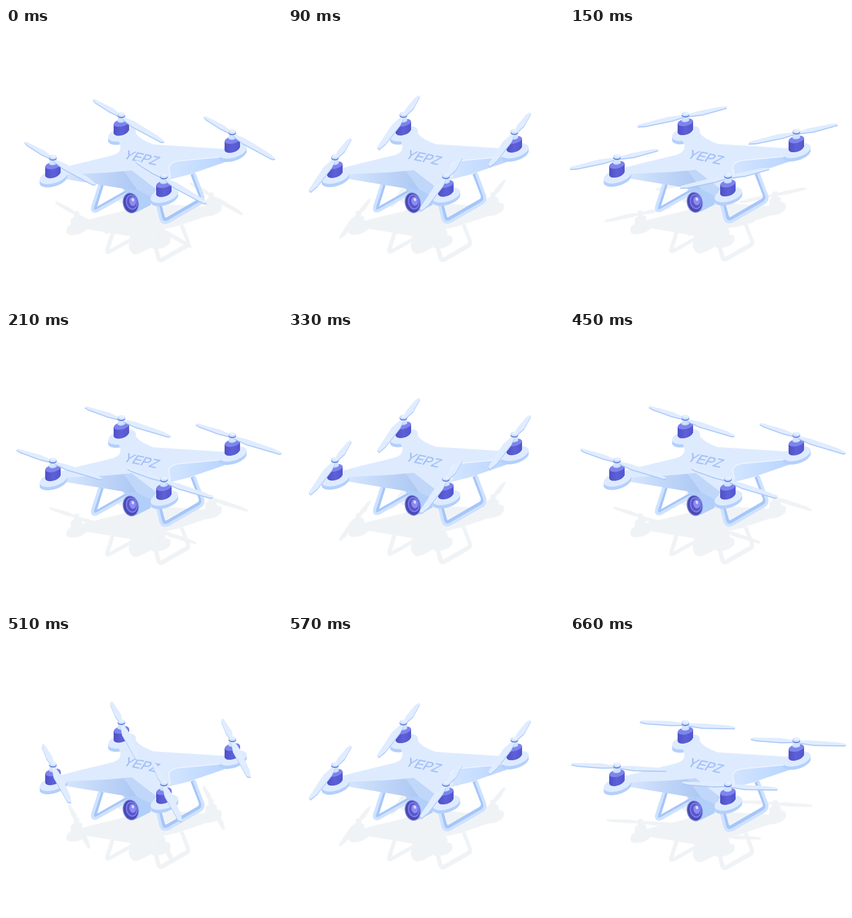
Write an HTML page that moves like this. It is 500 px wide and 500 px high and loops after 0.69 s.

```html
<!DOCTYPE html>
<html lang="en">
<head>
<meta charset="utf-8">
<title>Drone</title>
<style>
  html, body { margin: 0; width: 100%; height: 100%; overflow: hidden; background: #fff; }
  svg { display: block; width: 100vw; height: 100vh; }
  text { font: 22px "Liberation Sans", Arial, sans-serif; }
</style>
</head>
<body>
<svg viewBox="0 0 500 500">
  <defs>
    <filter id="flat" x="-10%" y="-10%" width="120%" height="120%" color-interpolation-filters="sRGB">
      <feFlood flood-color="#f0f3f6"/>
      <feComposite in2="SourceAlpha" operator="in"/>
    </filter>
    <linearGradient id="leftSide"><stop stop-color="#d8e7fd"/><stop offset="1" stop-color="#abc7f3"/></linearGradient>
    <linearGradient id="rightSide"><stop stop-color="#d3e5ff"/><stop offset="1" stop-color="#b9d5ff"/></linearGradient>
    <linearGradient id="purple"><stop stop-color="#4f50c4"/><stop offset=".5" stop-color="#5d60d8"/><stop offset="1" stop-color="#5356cb"/></linearGradient>

    <g id="pod">
      <g fill="#b4d0fb">
        <ellipse cx="1" cy="38" rx="26" ry="12" transform="rotate(-17 1 38)"/>
        <ellipse cx="1" cy="35" rx="26" ry="12" transform="rotate(-17 1 35)"/>
      </g>
      <ellipse cx="1" cy="32" rx="26" ry="12" transform="rotate(-17 1 32)" fill="#deebff"/>
    </g>

    <path id="blades"/>
    <g id="rotor">
      <path d="M-14 14V31Q-12 36-2 35Q10 33 14 25V9Z" fill="url(#purple)"/>
      <ellipse cy="12" rx="14" ry="6.5" transform="rotate(-12 0 12)" fill="#7d84ee"/>
      <path d="M-6 0L-7 10Q0 14 7 9L6 0Z" fill="#d3e3fd"/>
      <path d="M-7 9Q0 13 7 8" fill="none" stroke="#b3cdf8"/>
      <use href="#blades" y="2" fill="#abc9f7"/>
      <use href="#blades" fill="#e0ecff"/>
      <ellipse cy="-1" rx="7" ry="4.2" fill="#5f7fd9"/>
      <ellipse cy="-3" rx="7" ry="4.2" fill="#cfe1ff"/>
      <ellipse cx="1" cy="-4.5" rx="5" ry="2.6" fill="#e6f0ff"/>
    </g>

    <g id="drone">
      <g fill="none" stroke-linejoin="round">
        <g stroke="#a5c6fa" stroke-width="8">
          <path d="M173 284L161 323Q159 331 167 327L220 297"/>
          <path d="M276 314L284 343Q287 350 294 346L349 314Q355 310 353 303L338 264"/>
        </g>
        <g stroke="#cfe2ff" stroke-width="5.5">
          <path d="M170 284L157 324Q155 335 165 331L220 300"/>
          <path d="M273 314L280 344Q283 356 294 351L351 318Q359 313 356 304L341 264"/>
        </g>
      </g>

      <path d="M98 263L183 261L212 257L240 294L212 291L104 273Z" fill="url(#leftSide)"/>
      <path d="M212 257L230 256L274 290L264 307L238 294Z" fill="#c0d7fa"/>
      <path d="M212 291L238 293L264 306L262 321L236 334L220 300Z" fill="#b2cff9"/>
      <path d="M392 231L312 241Q294 245 295 256L298 274L330 266L397 243Z" fill="url(#rightSide)"/>

      <g transform="rotate(-12 226 317)">
        <ellipse cx="226" cy="317" rx="14.5" ry="19" fill="#8190e8"/>
        <ellipse cx="226" cy="317" rx="13" ry="17.5" fill="#4c49b1"/>
        <ellipse cx="228" cy="316" rx="10.5" ry="14" fill="#797fe9"/>
        <ellipse cx="228" cy="316" rx="8.5" ry="11.5" fill="#5a56c9"/>
        <ellipse cx="230" cy="315" rx="6" ry="8" fill="#8d8cf1"/>
        <ellipse cx="231" cy="312" rx="2.2" ry="3" fill="#d9dbff"/>
      </g>

      <use href="#pod" x="209" y="160"/>
      <use href="#pod" x="85" y="237"/>
      <use href="#pod" x="410" y="191"/>
      <use href="#pod" x="286" y="271"/>
      <path d="M72 257L96 255L130 246L192 231Q210 226 207 212L203 203L232 184Q236 200 268 211L394 219L402 231L387 234L312 241Q294 244 295 255L298 274L272 292L228 258L183 262L98 266Z" fill="#deebff"/>
      <path d="M387 234L312 241Q294 244 295 255L298 270" fill="none" stroke="#f0f6ff" stroke-width="1.5"/>
      <text transform="matrix(1.05 .22 -.65 .95 211 236)" fill="#a4c0f6" stroke="#a4c0f6" stroke-width=".5">YEPZ</text>

      <use href="#rotor" x="209" y="160"/>
      <use href="#rotor" x="410" y="191"/>
      <use href="#rotor" x="85" y="237"/>
      <use href="#rotor" x="286" y="271"/>
    </g>
  </defs>
  <g id="shadow"><use href="#drone" filter="url(#flat)"/></g>
  <g id="body"><use href="#drone"/></g>
</svg>
<script>
  const LOOP = 690, STEP = 30, BOB = 720;
  const $ = id => document.getElementById(id);

  // One blade as [radius, chord offset]
  const outline = [[.06, -.03], [.3, -.06], [.85, -.04], [1, 0], [.97, .05], [.35, .09], [.06, .04]];

  // Perspective view of the rotor plane
  function project(r, s, a) {
    const u = r * Math.cos(a) - s * Math.sin(a);
    const v = r * Math.sin(a) + s * Math.cos(a);
    const w = 1 - .0345 * u - .261 * v;
    return [(87 * u - 3 * v) / w, (3.4 * u + 51 * v) / w].map(n => n.toFixed(2));
  }

  const blade = a => "M" + outline.map(([r, s]) => project(r, s, a)).join("L") + "Z";

  function draw(now) {
    const t = Math.floor(now % LOOP / STEP) * STEP;
    const turn = (46 + t * .75) * Math.PI / 180;
    const angle = turn + .07 * Math.sin(6 * turn);
    const lift = (1 - Math.cos(2 * Math.PI * t / BOB)) / 2;
    $("blades").setAttribute("d", blade(angle) + blade(angle + Math.PI));
    $("body").setAttribute("transform", `translate(0 ${-3 * lift})`);
    $("shadow").setAttribute("transform", `translate(64 ${161.6 - 4 * lift}) scale(.75 .74)`);
    requestAnimationFrame(draw);
  }
  draw(0);
</script>
</body>
</html>
```
